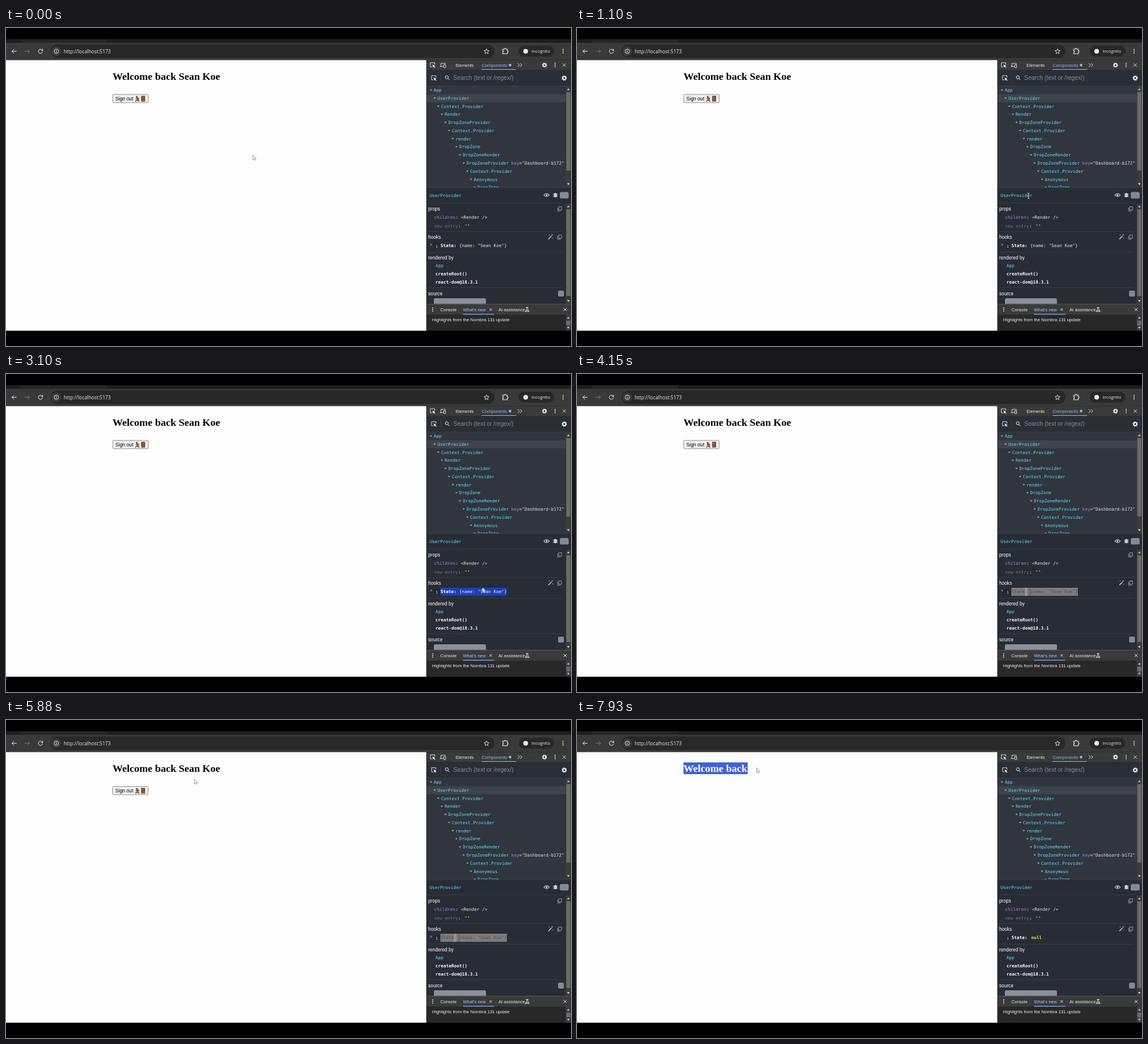
Write an HTML page that moves like this. It is 960x540 px and loops after 8 s.

```html
<!DOCTYPE html>
<html lang="en">
<head>
<meta charset="utf-8">
<title>Sign out demo</title>
<style>
html, body { margin: 0; width: 100%; height: 100%; overflow: hidden; background: #000; }
svg { display: block; width: 960px; height: 540px; }
text { white-space: pre; }
.ui { font-family: "Liberation Sans", Arial, sans-serif; }
.bar { font-family: "Open Sans", "Noto Sans", sans-serif; }
.mono { font-family: "DejaVu Sans Mono", monospace; font-size: 7.47px; }
.h1 { font: bold 17.47px "Liberation Serif", "Times New Roman", serif; }
</style>
</head>
<body>
<svg id="stage" viewBox="0 0 960 540" xmlns="http://www.w3.org/2000/svg"></svg>
<script>
const stage = document.getElementById('stage');
const USER = 'Sean Koe';
const CYAN = '#61dafb', PURPLE = '#9d87d2', LIGHT = '#e8eaed', LINE = '#3d424a';

const rect = (x, y, w, h, fill, more = '') =>
  `<rect x="${x}" y="${y}" width="${w}" height="${h}" fill="${fill}" ${more}/>`;
const text = (x, y, str, fill, cls, size = '', more = '') =>
  `<text x="${x}" y="${y}" fill="${fill}" class="${cls}" ${size && `font-size="${size}"`} ${more}>${
    str.replace(/&/g, '&amp;').replace(/</g, '&lt;')}</text>`;
const mono = (x, y, str, fill, more) => text(x, y, str, fill, 'mono', '', more);
const line = (d, color = LIGHT, w = 1, more = '') =>
  `<path d="${d}" fill="none" stroke="${color}" stroke-width="${w}" ${more}/>`;
const shape = (d, fill) => `<path d="${d}" fill="${fill}"/>`;
const dot = (x, y, r, fill = LIGHT) => `<circle cx="${x}" cy="${y}" r="${r}" fill="${fill}"/>`;
const ring = (x, y, r, w = 1) =>
  `<circle cx="${x}" cy="${y}" r="${r}" fill="none" stroke="${LIGHT}" stroke-width="${w}"/>`;
const group = (id, body, more = '') => `<g id="${id}" ${more}>${body}</g>`;

const dots = (x, y, gap) => [-gap, 0, gap].map(d => dot(x, y + d, 0.9)).join('');
const cross = (x, y, s) => line(`M${x - s} ${y - s}l${2 * s} ${2 * s}m0 ${-2 * s}l${-2 * s} ${2 * s}`, LIGHT, 0.9);
const down = (x, y, s, fill) => shape(`M${x - s} ${y - s * 0.6}h${2 * s}l${-s} ${s * 1.3}z`, fill);
const up = (x, y, s, fill) => shape(`M${x - s} ${y + s * 0.6}h${2 * s}l${-s} ${-s * 1.3}z`, fill);
const gear = (x, y, r) => ring(x, y, r * 0.6, r * 0.45) +
  `<circle cx="${x}" cy="${y}" r="${r * 0.9}" fill="none" stroke="${LIGHT}" stroke-width="${r * 0.35}" stroke-dasharray="${r * 0.35}"/>`;
const copy = (x, y) => line(`M${x - 1.5} ${y - 3.5}h5v5.5h-5zM${x - 3.2} ${y - 2}v5.7h5`, '#afb3b9', 0.8);
const picker = (x, y) => line(`M${x + 3.5} ${y - 1}v-3h-7.5v7h3`, LIGHT, 0.9) +
  shape(`M${x - 0.5} ${y - 1}l5 2l-2 0.8l2 2.2l-0.8 0.8l-2.1 -2.1l-0.8 2z`, LIGHT);

function scrollbar(y, end, thumbY, thumbEnd) {
  return rect(951, y, 9, end - y, '#3b3b3d') + rect(952, thumbY, 7, thumbEnd - thumbY, '#696969') +
    up(955.5, y + 5, 2.4, '#bbb') + down(955.5, end - 5, 2.4, '#ccc');
}

function toolbar() {
  return rect(0, 19, 960, 7, '#1d1d1d') + rect(25, 19, 147, 7, '#262626', 'rx="2"') +
    rect(0, 25, 960, 29.5, '#393939') + rect(76, 28, 754, 23, '#282828', 'rx="11.5"') +
    line('M18 39.5h-8m3.5 -3.5l-3.5 3.5l3.5 3.5') +
    line('M32 39.5h8m-3.5 -3.5l3.5 3.5l-3.5 3.5', '#777') +
    line('M61.6 37.6a3.6 3.6 0 1 0 0.5 2.6M62.3 35.5v2.8h-2.8') +
    dot(85.5, 39.5, 8, '#3c3c3c') + ring(85.5, 39.5, 3.7, 0.9) + line('M85.5 39v2.5M85.5 37.2v1') +
    text(98, 42.8, 'http://localhost:5173', LIGHT, 'bar', 8.27) +
    line('M816.5 35.5l1.2 2.7l3 .3l-2.3 2l.7 3l-2.6 -1.6l-2.6 1.6l.7 -3l-2.3 -2l3 -.3z', LIGHT, 0.9) +
    line('M844 36h2.6a1.4 1.4 0 0 1 2.8 0h2.4v2.6a1.4 1.4 0 0 1 0 2.8v2.3h-7.8v-2.5a1.3 1.3 0 0 0 0 -2.6z', LIGHT, 1.1) +
    rect(871, 30, 60.5, 18.5, '#272727', 'rx="9.2"') + dot(883, 39.5, 4) +
    text(893, 42.2, 'Incognito', LIGHT, 'bar', 7.3) + dots(946.5, 39.5, 3);
}

function page() {
  const button = rect(181.3, 112.8, 60.4, 14, '#efefef', 'id="face" rx="1.5" stroke="#767676" stroke-width=".8"') +
    text(185.8, 122.8, 'Sign out', '#000', 'ui', 8.3) +
    dot(222.2, 116.8, 1.6, '#6d4630') +
    line('M222.5 118.5l2.3 2.5l-1 2l2.8 1.3M224 121.5l-2.8 1.4l-1 2M222.6 119l-2.3 1.4M223.5 119l2.8 .2', '#6d4630', 1.6) +
    rect(229.7, 115.2, 6.6, 9.6, '#6b3f22') + rect(231, 116.5, 4, 3, '#9a6238') +
    rect(231, 120.8, 4, 3, '#9a6238');
  return rect(0, 54.5, 714.5, 459.5, '#fefefe') +
    text(181, 87.6, '', '#000', 'h1', '', 'id="title"') +
    `<clipPath id="cut">${rect(181, 72, 0, 20, '#000', 'id="cutBox"')}</clipPath>` +
    group('picked', rect(181, 72, 190, 20, '#4163d3') +
      text(181, 87.6, '', '#fff', 'h1', '', 'id="titleOn"'), 'clip-path="url(#cut)"') +
    group('button', button);
}

function tree() {
  const names = ['App', 'UserProvider', 'Context.Provider', 'Render', 'DropZoneProvider',
    'Context.Provider', 'render', 'DropZone', 'DropZoneRender', 'DropZoneProvider',
    'Context.Provider', 'Anonymous', 'DropZone'];
  const rows = names.map((name, i) => {
    const x = 726.8 + i * 6.18, y = 105.5 + i * 13.77;
    return down(x - 4.7, y, 2.1, '#9aa0aa') + mono(x, y + 2.6, name, CYAN);
  }).join('');
  return rect(715, 71, 245, 200, '#31353d') + rect(715, 71, 245, 28, '#2a2e36') +
    rect(715, 98.3, 245, 0.8, LINE) +
    picker(727, 85) + rect(738.5, 77, 0.7, 16, LINE) + ring(749, 83.7, 2.6, 1) +
    line('M751 85.8l2.5 2.6') + text(760, 88.3, 'Search (text or /regex/)', '#858a94', 'ui', 10) +
    gear(948.5, 85, 4.2) +
    rect(715, 112.5, 236, 13.7, '#3f434b') +
    `<clipPath id="treeCut">${rect(715, 99, 236, 172, '#000')}</clipPath>` +
    group('rows', rows + mono(858.6, 232, 'key', PURPLE) + mono(872, 232, '=', LIGHT) +
      mono(876.5, 232, '"Dashboard-b172"', '#dfe2e6'), 'clip-path="url(#treeCut)"') +
    scrollbar(99, 270, 109, 242);
}

function details() {
  const value = `{name: "${USER}"}`;
  const label = (y, str) => text(717.3, y, str, '#fff', 'ui', 8.13);
  return rect(715, 271, 245, 199, '#282c34') + rect(715, 270.6, 245, 0.8, LINE) +
    mono(719.7, 287, 'UserProvider', CYAN) +
    line('M914 283.8q4.5 -5.5 9 0q-4.5 5.5 -9 0z', '#c9ccd2', 1.1) + dot(918.5, 283.8, 1.6, '#c9ccd2') +
    shape('M931 281.5q2.5 -3 5 0v4.5q-2.5 3 -5 0z', '#c9ccd2') +
    line('M929.5 281.8h8M929.5 284h8M929.5 286.3h8', '#c9ccd2', 0.8) +
    rect(941, 278.6, 15, 11, '#858995', 'rx="2.5"') +
    [296.6, 345, 380.3, 440.5].map(y => rect(718, y, 227, 0.8, LINE)).join('') +
    label(310.2, 'props') + copy(940.5, 307) +
    mono(727.5, 324.3, 'children', PURPLE) + mono(763.8, 324.3, ':', LIGHT) +
    mono(773, 324.3, '<Render />', '#dfe2e6') +
    mono(727.5, 338.5, 'new entry', '#6d737e') + mono(768.6, 338.5, ':', LIGHT) +
    mono(779.3, 338.5, '""', '#e0e030') +
    label(358.2, 'hooks') + copy(940.5, 355) +
    line('M921.5 358.5l5.5 -5.5', '#c9ccd2', 1.4) +
    line('M928 350v2.4M926.8 351.2h2.4M923 350.5v2M929 355.5v2', '#c9ccd2', 0.7) +
    rect(728.6, 365.3, 6.3, 9.3, '#22252c', 'rx="1.5"') + mono(730, 372.8, '1', LIGHT, 'style="font-size:6.2px"') +
    group('expand', shape('M721.3 365.5l3 2.2l-3 2.2z', '#7b818c')) +
    rect(738, 363, 0, 13.7, '#1c3fb9', 'id="hookSel"') +
    group('hookOn', mono(738.2, 372.4, 'State:', '#fff', 'font-weight="bold"') +
      group('value', mono(770, 372.4, value, '#e3e5e8'))) +
    group('hookOff', rect(738, 363, 113, 13.7, '#7c7c7c') + rect(761, 363, 4, 13.7, '#979797') +
      rect(769, 363, 1, 13.7, '#505050') + mono(738.2, 372.4, 'State:', '#505050') +
      mono(770, 372.4, value, '#505050')) +
    group('empty', mono(771.7, 372.4, 'null', '#e0e030', 'font-weight="bold"')) +
    label(393.4, 'rendered by') + mono(729.8, 406.2, 'App', CYAN) +
    mono(729.8, 420, 'createRoot()', '#f4f4f4', 'font-weight="bold"') +
    mono(729.8, 433.7, 'react-dom@18.3.1', '#f4f4f4', 'font-weight="bold"') +
    label(454.2, 'source') + rect(938, 446, 10, 10, '#858995', 'rx="2"') +
    rect(727, 459, 88.5, 13, '#8b8f9a', 'rx="2.5"') +
    scrollbar(298, 468.5, 308, 455);
}

function devtools() {
  const tab = (x, y, str, fill = LIGHT, size = 7.55) => text(x, y, str, fill, 'ui', size);
  return rect(714.3, 54.5, 245.7, 459.5, '#282828') + rect(715, 54.5, 245, 16.5, '#3a3a3a') +
    picker(725, 63) + line('M739 60h7.5v1.5M739 60v5.5h-1.5h5M743.5 62.5h3.5v4.5h-3.5z', LIGHT, 0.9) +
    tab(764, 65.7, 'Elements', LIGHT, 7.4) + tab(808.3, 65.7, 'Components', '#8ab4f8', 7.65) +
    dot(856.5, 63, 2.3, '#8ab4f8') + rect(808, 70, 58.5, 1.2, '#8ab4f8') +
    line('M869.5 60l3 3l-3 3m4 -6l3 3l-3 3', LIGHT, 0.9) +
    gear(915, 63, 4) + dots(933, 63, 2.8) + cross(948.5, 63, 2.7) +
    tree() + details() +
    rect(715, 468.3, 245, 2, '#48494c') + rect(715, 470, 245, 16.8, '#3a3a3a') +
    dots(725, 478, 2.8) + tab(738, 480.7, 'Console') + tab(776.5, 480.7, "What's new", '#a8c7fa') +
    cross(823.5, 478, 2) + rect(776.5, 485.5, 53, 1.2, '#8ab4f8') +
    tab(836.8, 480.7, 'AI assistance') + cross(950, 478, 2.6) +
    line('M883.5 474.5h4m-3 0v3l-2.5 4h7l-2.5 -4v-3M883.5 479.5h4', LIGHT, 0.9) +
    tab(724, 497.6, 'Highlights from the Nombra 131 update') +
    scrollbar(487, 514, 497, 505);
}

stage.innerHTML = rect(0, 0, 960, 540, '#000') + toolbar() + page() + devtools() +
  group('arrow', '<path d="M0 0v8.2l1.9 -1.7l1.3 2.7l1.3 -.6l-1.3 -2.6h2.6z" fill="#fff" stroke="#777" stroke-width=".7"/>') +
  group('beam', line('M-1.6 -4.5h3.2M0 -4.5v9M-1.6 4.5h3.2', 'currentColor', 0.9));

const el = id => document.getElementById(id);
const show = (id, on) => el(id).setAttribute('display', on ? 'inline' : 'none');
const part = (t, a, b) => Math.min(1, Math.max(0, (t - a) / (b - a)));
const smooth = u => u * u * (3 - 2 * u);

// time, x, y, pointer kind from here on
const path = [
  [0, 419.5, 215.5, 'arrow'], [500, 419.5, 215.5, 'arrow'], [1080, 767, 285, 'beam'],
  [1130, 767, 285, 'beam'], [1300, 743, 368, 'beam'], [1500, 737, 370, 'beam'],
  [1650, 737, 370, 'beam'], [2250, 838, 369, 'arrow'], [2400, 838, 366, 'arrow'],
  [2750, 785, 370, 'arrow'], [3100, 809.5, 362.5, 'arrow'], [3250, 809.5, 362.5, 'arrow'],
  [4050, 268, 88, 'beam'], [4150, 214.5, 84, 'beam'], [4300, 181, 82, 'beam'],
  [4380, 181, 82, 'beam'], [4880, 364, 82, 'beam'], [5200, 364, 82, 'beam'],
  [5730, 330, 98, 'arrow'], [6500, 230.5, 120.5, 'arrow'], [7130, 230.5, 120.5, 'arrow'],
  [7350, 182, 82, 'beam'], [7400, 182, 82, 'beam'], [7780, 305, 81, 'arrow'],
  [8000, 305, 81, 'arrow']
];

function draw(t) {
  const i = path.findIndex(k => k[0] > t);
  const [t0, x0, y0, kind] = path[i - 1], [t1, x1, y1] = path[i];
  const lin = part(t, t0, t1), u = t1 - t0 > 150 ? smooth(lin) : lin;
  const x = x0 + (x1 - x0) * u, y = y0 + (y1 - y0) * u;
  for (const id of ['arrow', 'beam']) {
    show(id, id === kind);
    el(id).setAttribute('transform', `translate(${x} ${y})`);
  }
  el('beam').setAttribute('color', x > 714 ? '#ccc' : '#888');

  const out = t >= 6630, cleared = t >= 7130, blurred = t >= 4100 && !cleared;
  const title = out ? 'Welcome back' : 'Welcome back ' + USER;
  el('title').textContent = el('titleOn').textContent = title;
  const selected = out ? 109 * smooth(part(t, 7400, 7730))
    : t < 5780 ? 184 * smooth(part(t, 4380, 4880)) : 0;
  el('cutBox').setAttribute('width', selected);
  show('button', !out);
  el('face').setAttribute('fill', t > 6350 ? '#e5e5e5' : '#efefef');

  el('hookSel').setAttribute('width', t < 4100 ? 113 * smooth(part(t, 1650, 2250)) : 0);
  show('hookOff', blurred);
  show('hookOn', !blurred);
  show('value', !cleared);
  show('expand', !cleared);
  show('empty', cleared);
}

const start = performance.now();
function tick() {
  draw((performance.now() - start) % 8000);
  requestAnimationFrame(tick);
}
tick();
</script>
</body>
</html>
```
